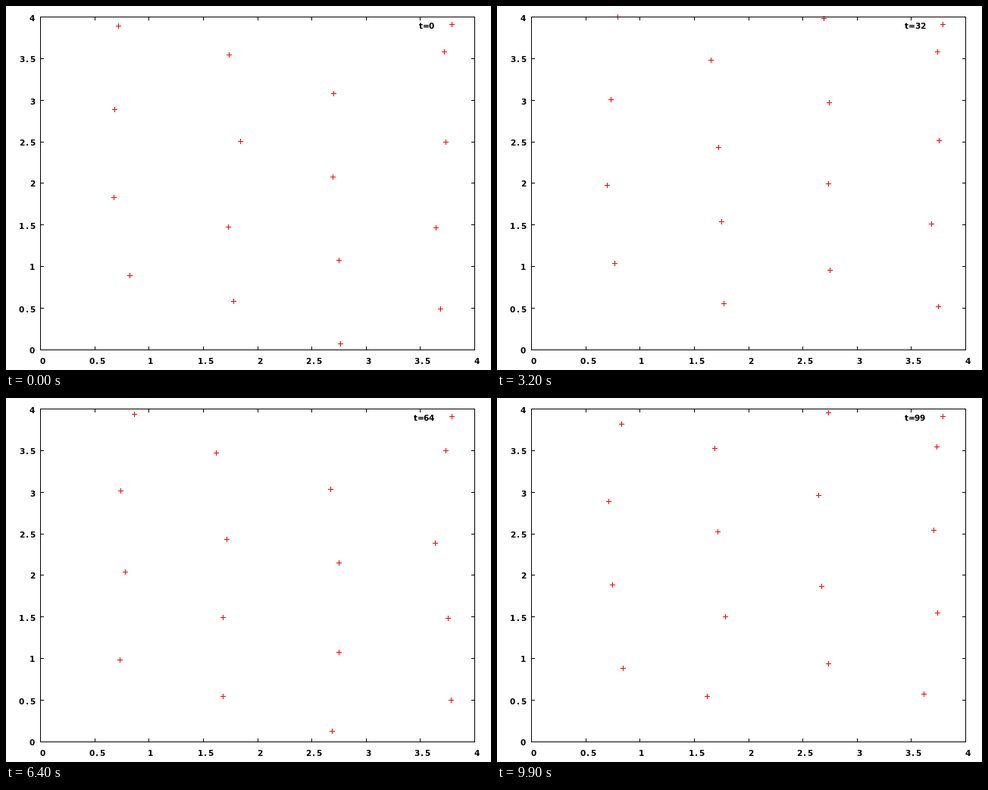
Write a matplotlib script that moves like this. It is 640 px wide and 480 px high and loops after 10000 ms.

```python
import numpy as np
import matplotlib.pyplot as plt
from matplotlib.animation import FuncAnimation
from matplotlib.collections import LineCollection

LEFT, RIGHT, TOP, BOTTOM = 45, 618, 14, 453
WIDTH, HEIGHT = RIGHT - LEFT, BOTTOM - TOP
FRAMES, INTERVAL = 100, 100
SIDE = 4  # particles per column, and number of columns
LINE = dict(linewidths=0.72, capstyle="butt", snap=False)  # one pixel at 100 dpi
PITCH = 7
TICK = 4

# Staggered lattice of rest positions; neighbouring columns sit half a cell apart.
col, row = np.divmod(np.arange(SIDE * SIDE), SIDE)
HOME_X = 151 + WIDTH / SIDE * col
HOME_Y = 69 + HEIGHT / SIDE * row + 51 * np.sin(np.pi / 2 * (col - 1))

# Slow slide of each whole column: amplitude, period, time of lowest point.
SLIDE = np.array([(9, 100, 92), (7, 74, 49), (9, 75, 25), (5, 75, 55)])

# Thermal vibration: two sine waves per particle and axis.
rng = np.random.default_rng(5)
PHASE = rng.uniform(0, 2 * np.pi, (2, 2, SIDE * SIDE))
RATE = 2 * np.pi / rng.uniform(16, 42, (2, 2, SIDE * SIDE))


def positions(t):
    amp, period, peak = SLIDE[col].T
    slide = amp * np.cos(2 * np.pi * (t - peak) / period)
    shake_x, shake_y = np.sin(RATE * t + PHASE).sum(axis=1)
    x = HOME_X + 9 * shake_x
    y = HOME_Y + slide + 4.5 * shake_y
    return np.rint(x), TOP + np.rint(y - TOP) % HEIGHT


def hline(x0, x1, y):
    return [(x0 - 0.5, y), (x1 + 0.5, y)]


def vline(x, y0, y1):
    return [(x, y0 - 0.5), (x, y1 + 0.5)]


def plus(x, y):
    return [hline(x - 3, x + 3, y), vline(x, y - 3, y + 3)]


fig = plt.figure(figsize=(6.4, 4.8), dpi=100, facecolor="white")
ax = fig.add_axes([0, 0, 1, 1])
ax.set(xlim=(-0.5, 639.5), ylim=(479.5, -0.5))
ax.axis("off")


def write(text, x, baseline):
    """Set characters on a fixed pitch, starting at x."""
    return [ax.text(x + PITCH * i + 3, baseline, c, ha="center", va="baseline",
                    family="DejaVu Sans", weight="bold", size=7.6)
            for i, c in enumerate(text)]


frame = [hline(LEFT, RIGHT, TOP), hline(LEFT, RIGHT, BOTTOM),
         vline(LEFT, TOP, BOTTOM), vline(RIGHT, TOP, BOTTOM)]
for i in range(9):
    x = int(LEFT + WIDTH * i / 8 + 0.5)
    y = int(np.ceil(BOTTOM - HEIGHT * i / 8 - 0.5))
    frame += [vline(x, TOP, TOP + TICK), vline(x, BOTTOM - TICK, BOTTOM),
              hline(LEFT, LEFT + TICK, y), hline(RIGHT - TICK, RIGHT, y)]
    label = f"{i / 2:g}"
    write(label, x + 3 - PITCH * len(label) / 2, 471)
    write(label, 38 - PITCH * len(label), y + 5)
ax.add_collection(LineCollection(frame, colors="black", zorder=4, **LINE), autolim=False)

marks = LineCollection([], colors="red", zorder=2, **LINE)
ax.add_collection(marks, autolim=False)
counter = write("    ", 565 - 4 * PITCH, 29)


def update(t):
    segments = plus(588, 24)
    for x, y in zip(*positions(t)):
        segments += plus(x, y)
    marks.set_segments(segments)
    for slot, c in zip(counter, f"t={t}".rjust(4)):
        slot.set_text(c)
    return [marks, *counter]


anim = FuncAnimation(fig, update, frames=FRAMES, interval=INTERVAL,
                     repeat=True, repeat_delay=0, init_func=lambda: update(0))
plt.show()
```
